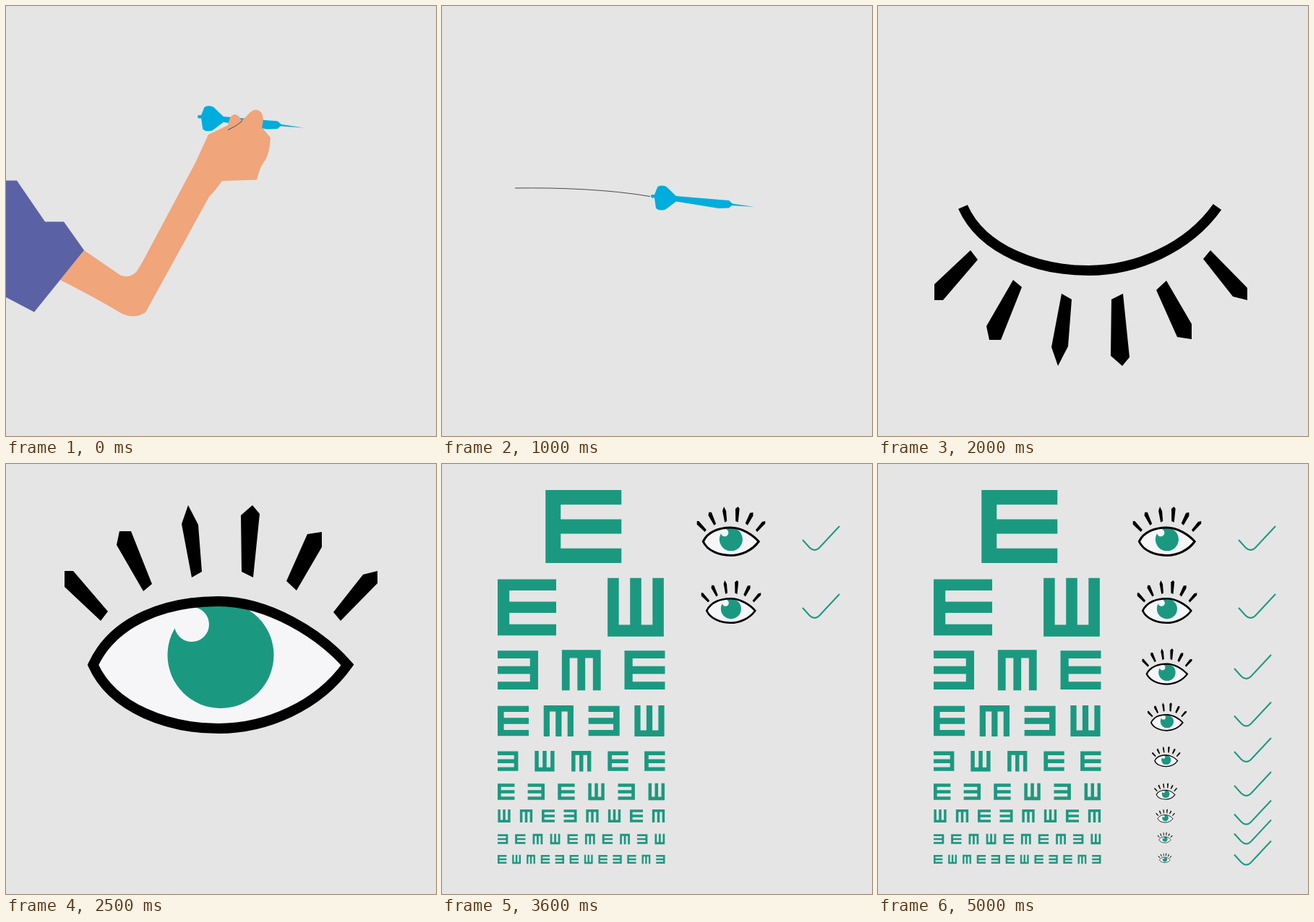
Write an HTML page that moves like this. It is 595x595 px and loops after 5500 ms.

```html
<!DOCTYPE html>
<html lang="en">
<head>
<meta charset="utf-8">
<title>Aim and eyesight</title>
<style>
html, body { margin: 0; width: 100%; height: 100%; overflow: hidden; background: #e5e5e5; }
svg { display: block; width: 100vw; height: 100vh; }
.skin { fill: #f0a57b; }
.sleeve { fill: #5a62a5; }
.dart { fill: #00addc; }
.teal { fill: #1b9980; }
.line { fill: none; stroke: #4a4a4a; stroke-width: 1; }
.lid { fill: none; stroke: #000; stroke-width: 14; stroke-miterlimit: 10; }
.check { fill: none; stroke: #1b9980; stroke-width: 2; }
</style>
</head>
<body>
<svg viewBox="0 0 595 595">
  <defs>
    <!-- Dart and trail start at their left end, the check and eye at their centre -->
    <path id="dart" class="dart" d="M0 0Q0-2 2-2H5L9-12Q10-14.500 15-14.500T22-12.500L35 0L95 5L108 6L113 10.500L143.500 15L112 13L108 16.500L94 17L35 7.500L21 18Q19 19.500 14 19.500T7 16.500L5 2.500H2Q0 2 0 0Z"/>
    <path id="trail" class="line" d="M0 0C62-1 132 2 187 11.500"/>
    <path id="check" class="check" d="M-25.500 2L-16 12.500Q-9 19.500-2.500 13L25.500-17"/>
    <path id="lashes" d="M81 148H93L141 204L131 217L81 170ZM157 93H173L202 166L190 176L153 112ZM252 57L266 84L271 149L257 157L243 83ZM341 57L351 69L342 157L326 149L325 71ZM417 97L437 94V115L402 175L388 162ZM494 153L514 148V165L463 217L453 205Z"/>
    <path id="lids" d="M120.500 278C150 214 225 190 294 190S435 235 472.500 278C432 335 360 366 294 366S148 340 120.500 278Z"/>
    <clipPath id="inside"><use href="#lids"/></clipPath>
    <g id="eye" transform="translate(-297.500 -215)">
      <use href="#lashes"/>
      <use href="#lids" fill="#f6f6f9"/>
      <g clip-path="url(#inside)">
        <circle class="teal" cx="297" cy="264.500" r="73.500"/>
        <circle cx="257" cy="222" r="24" fill="#f6f6f9"/>
      </g>
      <use href="#lids" class="lid"/>
    </g>
  </defs>

  <g class="scene">
    <use href="#dart" transform="translate(265 153) scale(1.025)"/>
    <path class="skin" d="M108 338L159 373Q173 377 181 367Q185 361 190 352L262 217L280 178L307 165Q310 150 317 150Q323 151 326 159L338 147Q346 140 353 147Q358 154 354 168L366 182Q365 202 359 213Q352 220 347 240.500L299 242Q290 255 281 264L193 424Q177 434 159 425Q128 406 75 379Z"/>
    <path class="sleeve" d="M0 241.500H15L54 298.500H80L108 338L39 423.500L0 403Z"/>
    <path class="line" d="M307 171.500Q318 167 327 159"/>
  </g>

  <g class="scene">
    <path class="skin" d="M69 268L127 289C200 305 300 326 324 339C350 352 369 386 380 417Q381 421 374 435L380 460Q380 469 372 470Q367 470 364 466Q360 472 354 472Q349 472 346 467Q318 422 310 396Q317 386 316 377L134 335Q101 347 86 334Q74 325 58 326Z"/>
    <path class="sleeve" d="M2 216Q18 210 30 223Q44 241 49 254Q50 263 69 268L54 347L2 368Z"/>
    <use href="#trail" x="408" y="291"/>
  </g>

  <g class="scene">
    <use href="#trail" x="101" y="252"/>
    <use href="#dart" x="289" y="263"/>
  </g>

  <g class="scene">
    <path d="M480 385H484V595H480Z" fill="#4f8ac6"/>
    <ellipse cx="482" cy="272.500" rx="31.500" ry="117" fill="#d3c8a5"/>
    <ellipse cx="477" cy="272" rx="14.500" ry="69.500" fill="#f9e526"/>
    <use href="#dart" x="335" y="261"/>
    <ellipse cx="476.500" cy="275.500" rx="5.500" ry="29" fill="#e66e78"/>
  </g>

  <g class="scene">
    <use href="#lashes" transform="matrix(1 0 0 -1 -3 555)"/>
    <path class="lid" d="M117.500 278C145 340 225 366 291 366S429 335 469.500 278"/>
  </g>

  <g class="scene"><use href="#eye" x="297.500" y="215"/></g>

  <g class="scene"><g id="chart" class="teal"></g><g id="marks"></g></g>
</svg>
<script>
const NS = "http://www.w3.org/2000/svg";
const LOOP = 5500, SCENE = 500, CHART = 3000, STEP = 200;
const LEFT = 77, RIGHT = 308.5, EYE_WIDTH = 433;
const byId = id => document.getElementById(id);

function add(parent, tag, attrs) {
  const el = document.createElementNS(NS, tag);
  for (const key in attrs) el.setAttribute(key, attrs[key]);
  return parent.appendChild(el);
}

// Unit letter centred on zero, opening to the right
const E = "M-.5-.5H.5V-.3H-.3V-.1H.5V.1H-.3V.3H.5V.5H-.5Z";
const TURN = { E: 0, M: 90, 3: 180, W: 270 };

const rows = [
  { text: "E", y: 86.5, size: 105, eye: 94.5, eyeY: 93.5, checkY: 103 },
  { text: "EW", y: 198.3, size: 81, eye: 82.5, eyeY: 191, checkY: 197 },
  { text: "3ME", y: 285.2, size: 56, eye: 69, eyeY: 280.5, checkY: 281 },
  { text: "EM3W", y: 355.5, size: 43, eye: 54, eyeY: 350, checkY: 346.5 },
  { text: "3WMEE", y: 411.2, size: 28.4, eye: 39, eyeY: 405, checkY: 396 },
  { text: "E3EW3W", y: 453.5, size: 23.4, eye: 31.5, eyeY: 453, checkY: 443 },
  { text: "WME3MWEM", y: 487, size: 18, eye: 26, eyeY: 487, checkY: 482.5 },
  { text: "3EMWEMEM3W", y: 519, size: 14.3, eye: 20.5, eyeY: 517, checkY: 509.5 },
  { text: "EWME3EWE3EM3", y: 547, size: 12.3, eye: 18.3, eyeY: 545.2, checkY: 538.5 }
];

// Letters spread evenly across the column; a lone one sits in the middle
function drawLetters({ text, y, size }) {
  const first = LEFT + size / 2, gaps = text.length - 1;
  const pitch = (RIGHT - LEFT - size) / (gaps || 2);
  [...text].forEach((letter, i) => {
    const x = first + pitch * (gaps ? i : 1) + (gaps ? 0 : 3);
    add(byId("chart"), "path", {
      d: E, transform: `translate(${x} ${y}) rotate(${TURN[letter]}) scale(${size} ${size * 0.96})`
    });
  });
}

const marks = [];
function drawMarks({ eye, eyeY, checkY }, i) {
  const x = Math.min(400, 395.3 + eye * 0.09);
  const at = CHART + STEP * (i + 2);
  const look = add(byId("marks"), "use", {
    href: "#eye", transform: `translate(${x} ${eyeY}) scale(${eye / EYE_WIDTH})`
  });
  const check = add(byId("marks"), "use", { href: "#check", x: i < 2 ? 524.5 : 518.5, y: checkY });
  // The first eye comes one step before its check
  marks.push([look, i ? at : at - STEP], [check, at]);
}

rows.forEach(drawLetters);
rows.forEach(drawMarks);

const scenes = document.querySelectorAll(".scene");
const show = (el, on) => { el.style.display = on ? "" : "none"; };

function draw(time) {
  const t = time % LOOP;
  const current = Math.min(Math.floor(t / SCENE), scenes.length - 1);
  scenes.forEach((scene, i) => show(scene, i === current));
  for (const [el, at] of marks) show(el, t >= at);
}

const start = performance.now();
function tick() {
  draw(performance.now() - start);
  requestAnimationFrame(tick);
}
tick();
</script>
</body>
</html>
```
